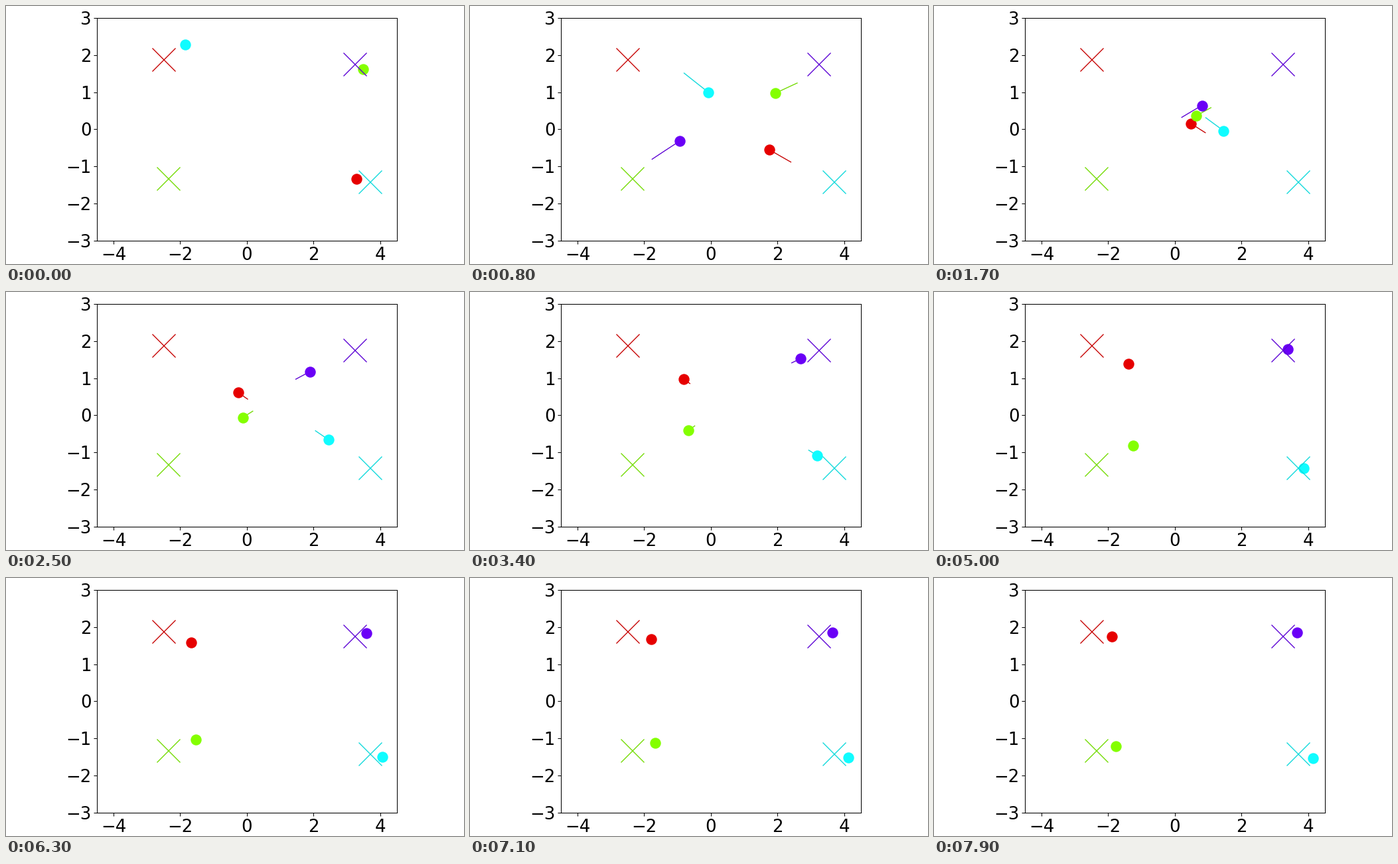
These frames come from a looping animation (690 by 388 pixels, 8000 ms). A matplotlib script:

```python
import numpy as np
import matplotlib.pyplot as plt
from matplotlib.animation import FuncAnimation
from matplotlib.colors import to_rgb

W, H, DPI = 690, 388, 100
PX = 72 / DPI            # points per pixel
FRAMES, STEP = 80, 0.1   # 8 s loop, seconds per frame
LAG = 0.35               # age of the trail's far end, seconds


def settle(start, end, rate):
    """Approach the end point with a decay that slowly quickens."""
    start, end, rate = map(np.array, (start, end, rate))
    return lambda t: end + (start - end) * np.exp(-rate * t * (1 + t / 11.5))


def glide(start, speed, tau):
    """Leave at a given velocity and lose speed with a long tail."""
    start, speed, tau = map(np.array, (start, speed, tau))
    return lambda t: start + speed * tau * np.arctan(t / tau)


# colour, goal, path, first visible frame
AGENTS = [
    ("#e60000", (-2.500, 1.892),
     glide((3.296, -1.327), (-2.02, 1.005), (1.93, 2.4)), 0),
    ("#84ff00", (-2.370, -1.316),
     glide((3.500, 1.608), (-2.05, -0.816), (1.93, 2.8)), 0),
    ("#10fcff", (3.692, -1.406),
     settle((-1.855, 2.277), (4.18, -1.535), (0.41, 0.48)), 0),
    ("#6a00f6", (3.223, 1.767),
     settle((-2.98, -1.55), (3.70, 1.85), (0.43, 0.53)), 1),
]

plt.rcParams["font.family"] = "DejaVu Sans"
fig = plt.figure(figsize=(W / DPI, H / DPI), dpi=DPI, facecolor="white")
left, right, top, bottom = 137.0, 588.6, 17.6, 353.3
ax = fig.add_axes([left / W, 1 - bottom / H, (right - left) / W, (bottom - top) / H])
ax.set(xlim=(-4.5, 4.5), ylim=(-3, 3), xticks=range(-4, 5, 2), yticks=range(-3, 4))
ax.tick_params(labelsize=26 * PX, length=4.6 * PX, width=1.05 * PX, pad=3.6 * PX)
for spine in ax.spines.values():
    spine.set_linewidth(1.05 * PX)

movers = []
for color, goal, path, first in AGENTS:
    shade = 0.86 * np.array(to_rgb(color))
    ax.plot(*goal, "x", color=shade, ms=35 * PX, mew=1.35 * PX, zorder=3)
    trail, = ax.plot([], [], color=shade, lw=1.35 * PX, zorder=2)
    ball, = ax.plot([], [], "o", color=color, ms=16.4 * PX, mew=0, zorder=2.5)
    movers.append((path, trail, ball, first))


def update(frame):
    now = frame * STEP
    times = np.linspace(max(0, now - LAG), now, 5)[:, None]
    for path, trail, ball, first in movers:
        x, y = path(times).T
        trail.set_data(x, y)
        ball.set_data(x[-1:], y[-1:])
        trail.set_visible(frame > 0)
        ball.set_visible(frame >= first)
    return [artist for _, trail, ball, _ in movers for artist in (trail, ball)]


anim = FuncAnimation(fig, update, frames=FRAMES, interval=1000 * STEP,
                     repeat=True, repeat_delay=0, blit=False)
plt.show()
```
